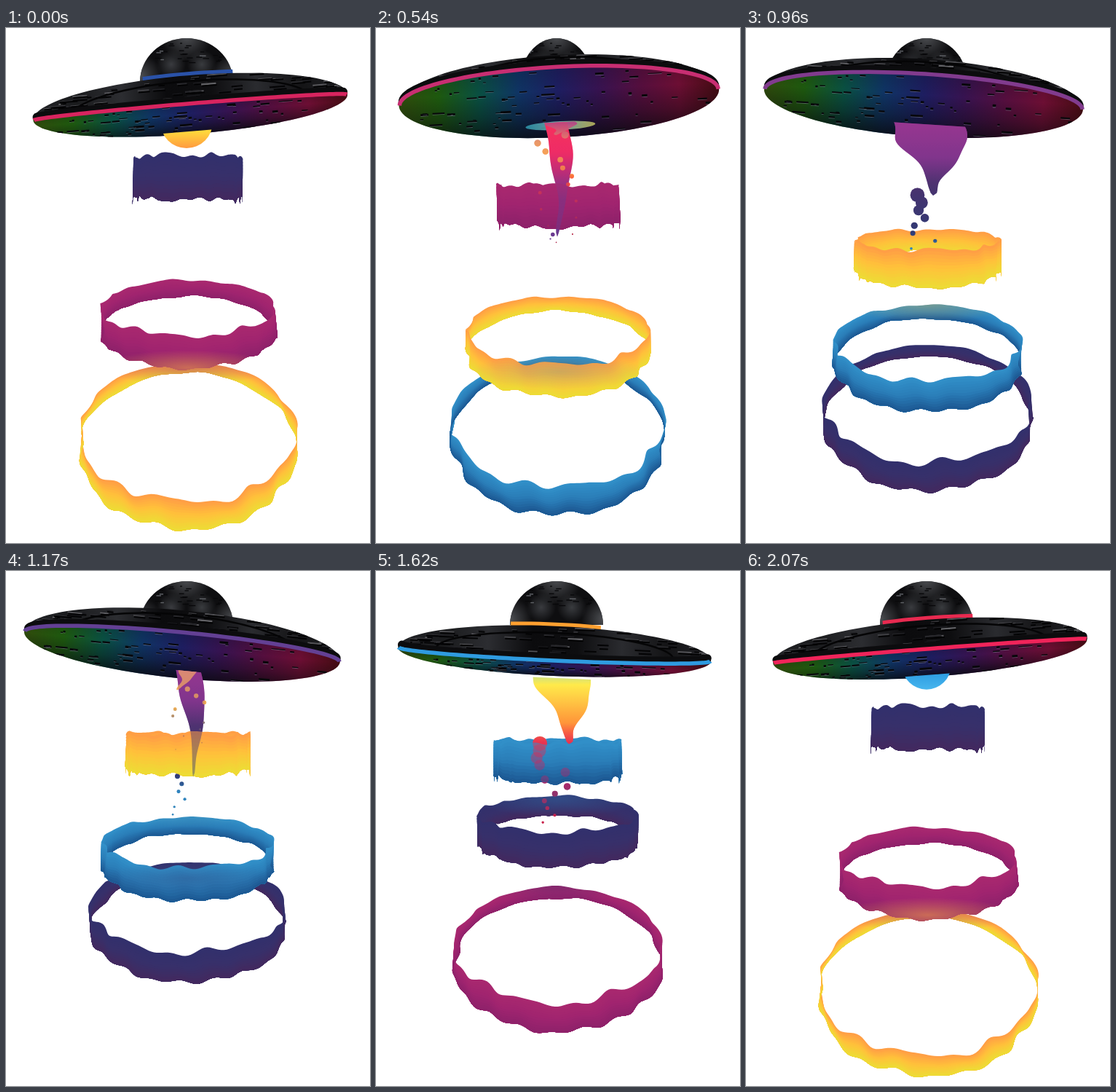
Animation, 500 px wide and 707 px high, one loop 2.1 s. Source, as an HTML page with a canvas:

```html
<!DOCTYPE html>
<html lang="en">
<head>
<meta charset="utf-8">
<title>Saucer and rings</title>
<style>
html, body { margin: 0; width: 100%; height: 100%; overflow: hidden; background: #fff; }
canvas { display: block; width: 100vw; height: 100vh; }
</style>
</head>
<body>
<canvas id="stage" width="500" height="707"></canvas>
<script>
const ctx = document.getElementById('stage').getContext('2d');
const LOOP = 2100, STEP = 30, TAU = Math.PI * 2;
const { sin, cos, abs, max, min, sqrt, PI } = Math;
const lerp = (a, b, u) => a + (b - a) * u;
const clamp = u => min(1, max(0, u));
const smooth = (a, b, x) => { const u = clamp((x - a) / (b - a)); return u * u * (3 - 2 * u); };
const hex = s => [0, 2, 4].map(i => parseInt(s.substr(i, 2), 16));
const rgb = (c, alpha = 1) => `rgba(${c.map(Math.round)},${alpha})`;
const mix = (a, b, u) => a.map((v, i) => lerp(v, b[i], u));

// Colour at a position among [position, hex] stops.
function ramp(stops, x) {
  let i = 1;
  while (i < stops.length - 1 && stops[i][0] < x) i++;
  const [x0, a] = stops[i - 1], [x1, b] = stops[i];
  return mix(hex(a), hex(b), clamp((x - x0) / (x1 - x0)));
}
function gradient(x0, y0, x1, y1, colors) {
  const g = ctx.createLinearGradient(x0, y0, x1, y1);
  colors.forEach((c, i) => g.addColorStop(i / (colors.length - 1), c));
  return g;
}
function glow(x, y, r, color) {
  const g = ctx.createRadialGradient(x, y, 0, x, y, r);
  g.addColorStop(0, rgb(color, .9));
  g.addColorStop(1, rgb(color, 0));
  ctx.fillStyle = g;
  ctx.fillRect(x - r, y - r, r * 2, r * 2);
}
function random(seed) {
  return () => (seed = (seed * 16807) % 2147483647) / 2147483647;
}

// ---- saucer ----
const RIM = [[0, 'd8245f'], [400, 'e02a68'], [900, '8a3a8c'], [1380, '45459a'], [1620, '2f9be0'], [2070, 'f0245a']];
const COLLAR = [[0, '2a52a8'], [1380, 'ffe030'], [1620, 'ffa030'], [2070, 'e82a50']];
const BELLY = ['#34520c', '#20620f', '#0a5848', '#10396e', '#20206a', '#3c1458', '#5c0f44', '#780f38', '#4a0c12'];
const HULL = ['#222327', '#1a1b1d', '#2c2d31', '#0b0b0d', '#0e0e10', '#2a2b2f', '#141416', '#222327'];

const rnd = random(77);
const plates = Array.from({ length: 70 }, () => ({
  r: sqrt(rnd()) * .95, a: rnd() * TAU, w: 3 + rnd() ** 2 * 16, h: 1 + rnd() * 2
}));
const ridges = Array.from({ length: 90 }, () => ({
  u: rnd(), a: PI * (.06 + .88 * rnd()), w: 5 + rnd() * 22, h: .8 + rnd() * 1.6, c: 25 + rnd() ** 2 * 75
}));

function pose(t) {
  const wave = shift => cos(TAU * (t - shift) / LOOP);
  const roll = -5.7 * wave(200), open = 17 + 27 * wave(675);
  return {
    roll: roll * PI / 180, open,
    x: 248 - roll * 1.1, y: 111 - open * .38,
    rx: 216 + open * .1, low: 34 + open * .5, top: 42 + open * .38,
    mouth: 144 - open * .34
  };
}

// Half ellipse through (-rx,0) and (rx,0), bulging up by h.
function arch(rx, h, back) {
  for (let i = 0; i <= 60; i++) {
    const a = PI * (back ? 60 - i : i) / 60;
    ctx.lineTo(-rx * cos(a), -h * sin(a));
  }
}
function strokeArch(rx, h, width, color) {
  ctx.beginPath();
  arch(rx, h);
  ctx.lineWidth = width;
  ctx.strokeStyle = color;
  ctx.stroke();
}

function dome(p) {
  const rx = 64 - max(0, p.open - 25) * .85, q = random(9);
  ctx.save();
  ctx.beginPath();
  ctx.ellipse(248, 74, rx, 60, 0, PI, TAU);
  ctx.closePath();
  ctx.fillStyle = '#0e0e10';
  ctx.fill();
  ctx.clip();
  glow(248, 12, 34, [82, 84, 88]);
  for (const side of [-1, 1]) {
    glow(248 + side * 21, 50, 20, [62, 64, 68]);
    glow(248 + side * rx, 66, 30, [84, 86, 90]);
  }
  for (let i = 0; i < 30; i++) {
    ctx.fillStyle = i % 5 ? '#08080a' : '#606368';
    ctx.fillRect(190 + q() * 116, 17 + q() * 30, 2 + q() * 7, 1.4);
  }
  ctx.restore();
}

function collar(t, p) {
  ctx.save();
  ctx.beginPath();
  ctx.rect(-62, -p.top - 8, 124, 14);
  ctx.clip();
  ctx.translate(0, -5);
  ctx.beginPath();
  arch(p.rx, p.top);
  ctx.fillStyle = rgb(ramp(COLLAR, t));
  ctx.fill();
  ctx.restore();
}

function hull({ rx, open, top }) {
  ctx.save();
  ctx.beginPath();
  arch(rx, top);
  arch(rx, open - 4, true);
  ctx.closePath();
  ctx.fillStyle = gradient(-rx, 0, rx, 0, HULL);
  ctx.fill();
  ctx.clip();
  for (const d of ridges) {
    const x = -rx * cos(d.a), y = -sin(d.a) * lerp(open, top, d.u);
    ctx.fillStyle = rgb([d.c, d.c, d.c + 4]);
    ctx.fillRect(x, y, d.w, d.h);
    ctx.fillStyle = '#030304';
    ctx.fillRect(x + 1, y + d.h, d.w, 2);
  }
  strokeArch(rx * .76, lerp(open, top, .8), 2.5, '#050506');
  ctx.restore();
}

function belly({ rx, open, low }) {
  ctx.save();
  ctx.beginPath();
  arch(rx, open);
  arch(rx, -low, true);
  ctx.closePath();
  ctx.fillStyle = gradient(-rx, 0, rx, 0, BELLY);
  ctx.fill();
  ctx.clip();
  ctx.fillStyle = gradient(0, -open, 0, low, ['rgba(8,8,12,.25)', 'rgba(8,8,12,.1)', 'rgba(8,8,12,.4)', 'rgba(8,8,10,.8)']);
  ctx.fillRect(-rx, -60, rx * 2, 130);
  const mid = (low - open) / 2, half = (low + open) / 2;
  for (const d of plates) {
    const x = d.r * cos(d.a) * rx, y = mid + d.r * sin(d.a) * half;
    ctx.fillStyle = 'rgba(135,135,155,.5)';
    ctx.fillRect(x, y + d.h, d.w, .9);
    ctx.fillStyle = '#07070a';
    ctx.fillRect(x, y, d.w, d.h);
  }
  if (open > 37) {
    ctx.globalAlpha = (open - 37) / 7;
    ctx.beginPath();
    ctx.ellipse(0, low - 16, 48, 6, 0, 0, TAU);
    ctx.fillStyle = gradient(-48, 0, 48, 0, ['#35b5cc', '#9be0d0', '#e8e66a']);
    ctx.fill();
  }
  ctx.restore();
}

function saucer(t, p) {
  dome(p);
  ctx.save();
  ctx.translate(p.x, p.y);
  ctx.rotate(p.roll);
  if (p.open < 14) collar(t, p);
  hull(p);
  ctx.lineCap = 'round';
  ctx.translate(0, -4);
  strokeArch(p.rx - 5, p.open, 11, '#0c0c0e');
  ctx.translate(0, 4);
  belly(p);
  ctx.lineCap = 'butt';
  strokeArch(p.rx - 1, p.open, 5.5, rgb(ramp(RIM, t)));
  ctx.restore();
}

// ---- rising rings ----
const ringKinds = [
  [1990, 'ff9f45', 'ffc23a', 'eedb35'],
  [370, '318fc8', '2a7db8', '1d5a94'],
  [690, '32306c', '37306a', '42295f'],
  [1340, 'a8286f', 'a0246f', '8f216a']
].map(([born, ...colors], i) => ({ born, seed: 1 + i * 1.4, stops: colors.map((c, j) => [j / 2, c]), color: hex(colors[1]) }));

const ripple = (a, s) => .42 * sin(5 * a + s) + .34 * sin(9 * a + s * 2.7) + .3 * sin(14 * a + s * 4.1) + .2 * sin(19 * a + s * 5.3);

// A ring climbs, narrows, and flattens as it nears eye level.
function liveRings(t) {
  return ringKinds.map(kind => {
    const age = (t - kind.born + LOOP) % LOOP, u = age / 1000, grow = min(1, age / 110);
    return {
      ...kind, age, u,
      y: min(580, 593 - 226 * u - 35 * u * u),
      rx: 152 - 28 * u - 19 * u * u,
      ry: 112 * max(0, 1 - u / 1.4) ** 1.2,
      front: grow * (36 + 12 * u * u),
      back: grow * (12 + 14 * u * u)
    };
  }).filter(r => r.age < 1700).sort((a, b) => b.y - a.y);
}

function halfRing(r, start) {
  const N = 110, LAYERS = 12, top = [], bottom = [];
  const s = r.seed + r.age / 900, calm = 1 - .5 * min(1, r.u);
  for (let i = 0; i <= N; i++) {
    const a = start - .04 + (PI + .08) * i / N;
    const h = lerp(r.back, r.front, (1 + sin(a)) / 2) * (1 + .35 * calm * ripple(a, s + 5)) + 2;
    const drip = 12 * smooth(.6, 1.1, r.u) * max(0, sin(17 * a + s)) ** 8 * cos(a) ** 6;
    const edge = (side, phase) => {
      const n = ripple(a, s + phase);
      return [250 + r.rx * (1 + .035 * n) * cos(a), r.y + r.ry * (1 + .035 * n) * sin(a) + side * h / 2 + 4 * calm * n];
    };
    top.push(edge(-1, 0));
    const [x, y] = edge(1, 1.3);
    bottom.push([x, y + drip]);
  }
  for (let k = 0; k < LAYERS; k++) {
    ctx.beginPath();
    top.forEach(([x, y], i) => ctx.lineTo(lerp(x, bottom[i][0], k / LAYERS), lerp(y, bottom[i][1], k / LAYERS)));
    for (let i = N; i >= 0; i--) ctx.lineTo(...bottom[i]);
    ctx.fillStyle = rgb(ramp(r.stops, k / (LAYERS - 1)));
    ctx.fill();
  }
}

// Neighbouring rings bleed into each other where they meet.
function bleed(lower, upper) {
  const a = upper.y + upper.ry + upper.front / 2, b = lower.y - lower.ry;
  const strength = clamp(1.3 - abs(a - b) / 60);
  if (!strength) return;
  ctx.save();
  ctx.globalCompositeOperation = 'source-atop';
  ctx.globalAlpha = strength;
  ctx.translate(250, lerp(a, b, .7));
  ctx.scale(1, .2);
  glow(0, 0, 120, mix(upper.color, lower.color, .5));
  ctx.restore();
}

// ---- falling liquid ----
// A spurt is a funnel of given half width tapering down to its neck, then drops down to its tail.
const spurts = [
  { t: 330, width: 45, neck: 228, sway: 2, tail: 240, count: 2, stops: [[135, 'f5305e'], [172, 'ee2c66'], [200, 'b82c78'], [235, '6a3a90']] },
  { t: 720, width: 44, neck: 186, sway: 0, tail: 345, count: 14, stops: [[130, 'b04c86'], [160, 'f0a065'], [195, 'ffa03c'], [212, 'f8443e'], [330, '8c1a50']] },
  { t: 960, width: 48, neck: 224, sway: 10, tail: 308, count: 8, stops: [[132, '963690'], [180, '80358c'], [215, '4a326e'], [285, '2f3a74'], [303, '2f85c0']] },
  { t: 1380, width: 36, neck: 210, sway: -12, tail: 302, count: 10, stops: [[130, 'f0a070'], [188, 'f0ae50'], [207, '8a7a80'], [225, '5a4068'], [300, '4a2a60']] },
  { t: 1620, width: 38, neck: 232, sway: 18, tail: 350, count: 12, stops: [[143, 'c8e088'], [156, 'ffea4a'], [212, 'ff9038'], [230, 'f0354c'], [280, 'a82870'], [340, 'c82048']] }
].map(spurt => {
  const r = random(spurt.t);
  r();
  const drops = Array.from({ length: spurt.count }, (_, i) => {
    const v = (i + .5) / spurt.count;
    return { x: 248 + (r() - .5) * 56, y: lerp(spurt.neck, spurt.tail, v), r: 1.5 + 9 * (1 - v) ** 1.3 };
  });
  return { ...spurt, drops };
});

function funnel({ width, neck, sway, t }, size, fall) {
  const N = 30;
  for (const side of [-1, 1]) {
    for (let i = 0; i <= N; i++) {
      const u = (side < 0 ? i : N - i) / N;
      const w = size * (lerp(width, 8, smooth(.25, .85, u)) + 3 * sin(u * 13 + t + side));
      const round = sqrt(1 - u ** 16);
      ctx.lineTo(247 + sway * u + 8 * sin(u * PI) + side * w * round, lerp(125, neck + 6 + fall, u));
    }
  }
  ctx.closePath();
}

function liquid(time) {
  for (const s of spurts) {
    const d = time - s.t, fall = d * .25, size = sqrt(max(0, 1 - abs(d) / 240));
    if (!size) continue;
    const y0 = s.stops[0][0], y1 = s.stops.at(-1)[0];
    const colors = Array.from({ length: 16 }, (_, i) => rgb(ramp(s.stops, lerp(y0, y1, i / 15))));
    ctx.fillStyle = gradient(0, y0, 0, y1, colors);
    ctx.beginPath();
    funnel(s, size, fall);
    ctx.fill();
    for (const { x, y, r } of s.drops) {
      ctx.beginPath();
      ctx.arc(x, y + fall, r * size, 0, TAU);
      ctx.fill();
    }
  }
}

// The orb peeks out around the loop point, changing colour there.
function orb(t) {
  const before = t > LOOP / 2, d = before ? LOOP - t : t;
  if (d > 240) return;
  ctx.beginPath();
  ctx.arc(248, 129, 36 * sqrt(1 - d / 240), 0, TAU);
  ctx.fillStyle = gradient(0, 142, 0, 165, before ? ['#2f9fe4', '#4ab8ee'] : ['#ffd83c', '#ff9a40']);
  ctx.fill();
}

function draw(t) {
  const p = pose(t), rings = liveRings(t);
  ctx.clearRect(0, 0, 500, 707);
  saucer(t, p);

  // everything below the hatch
  ctx.save();
  ctx.translate(248, p.mouth);
  ctx.rotate(p.roll);
  ctx.beginPath();
  ctx.rect(-400, 0, 800, 800);
  ctx.rotate(-p.roll);
  ctx.translate(-248, -p.mouth);
  ctx.clip();
  orb(t);
  rings.forEach(r => halfRing(r, PI));
  liquid(t);
  rings.forEach(r => halfRing(r, 0));
  rings.slice(1).forEach((upper, i) => bleed(rings[i], upper));
  ctx.globalAlpha = .45;
  liquid(t);
  ctx.restore();
}

function tick() {
  const t = performance.now() % LOOP;
  draw(Math.floor(t / STEP) * STEP);
  requestAnimationFrame(tick);
}
tick();
</script>
</body>
</html>
```
